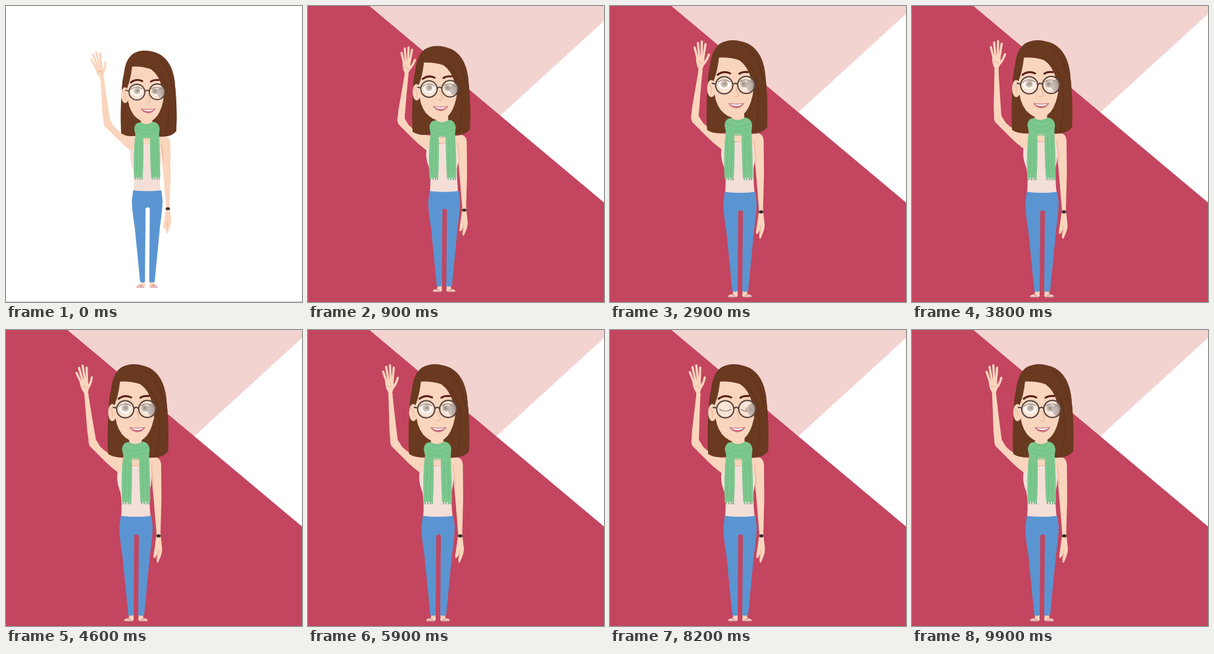
These frames come from a looping animation (450x450 px, 10 s). An HTML page:

```html
<!DOCTYPE html>
<html lang="en">
<head>
<meta charset="utf-8">
<title>Waving woman</title>
<style>
  html, body { margin: 0; width: 100%; height: 100%; overflow: hidden; background: #fff; }
  svg { display: block; width: 100vw; height: 100vh; }
  .skin { fill: #fad5bd; }
  .hair { fill: #693920; }
  .shade { fill: none; stroke: #eab795; stroke-width: 1.2; stroke-linecap: round; }
  .fingers { fill: none; stroke: #fad5bd; stroke-width: 3.4; stroke-linecap: round; }
  .fold { fill: none; stroke: #6fbb84; stroke-width: 1; stroke-linecap: round; }
  .lens { fill: #fff; fill-opacity: .32; stroke: #56443f; stroke-width: 2; }
</style>
</head>
<body>
<svg viewBox="0 0 450 450">
  <path id="pale" fill="#f3d3d0" d="M-400 788L288 160L850 -353V-800H-400Z"/>
  <path id="crimson" fill="#c4455f" d="M-384 -399.500L94 .5L930 701L-384 1400Z"/>
  <path id="floor" stroke="#c9c9c9" d="M0 449.5H450"/>

  <g id="woman">
    <!-- legs and feet -->
    <path class="skin" d="M187 430H194V437Q195 442 191 442H181Q178 441 181 439L187 437ZM201.500 430H208.500V437L214 439Q217 441 214 442H204Q200 442 201.500 437Z"/>
    <path d="M180 442H193M203 442H215M184 438L190 440M205 440L211 438" stroke="#c98297" stroke-width="1.300" fill="none"/>
    <path fill="#f4dfd8" d="M174 204Q185 208 196 206Q209 208 219 204Q224 226 218 246Q218 270 220 284H175Q177 262 174 246Q164 222 174 204Z"/>
    <path fill="#5a95d2" d="M174.500 282Q198 285 221 282L223 298Q223 312 219 340L210 433Q206 435 201 433L202 312Q198.500 308 195 312L194 433Q190 435 186 433L177 342Q172 312 172.500 298Z"/>

    <g class="upper">
      <!-- shoulders and arms -->
      <path class="skin" d="M135 164L143 177Q154 188 169 193L188 195H208L228 193Q235 195 235.500 204L236 255L234.500 310H228.500L224 255L220 212Q211 206 196 206Q184 206 176 209Q174 216 171 217Q160 209 151 200L127 176Q124 170 126 164Z"/>
      <path class="skin" d="M228.500 309H234.500L236.500 327Q238 335 235 343L231 353Q228 354 229 348L230 339L227 345Q223 348 224 342L226 328Z"/>
      <path class="shade" d="M231 334L229 348M221 205L224 235"/>
      <path d="M228 312.500H235" stroke="#55413b" stroke-width="3.400"/>
      <circle cx="231.500" cy="312.500" r="2.500" fill="#332b2b"/>
      <path d="M176 206L179 194M216 206L217 194" stroke="#eccfc5" stroke-width="2"/>
      <g id="forearm">
        <path class="skin" d="M125.500 169L125 154Q126 132 127.500 96H133.500Q134.500 128 136.500 166Q131 178 125.500 169Z"/>
        <g id="hand">
          <path class="skin" d="M-3 3L-3 -3Q-7 -10 -6.500 -20Q0 -26 6 -19Q7 -9 3 -3L3 3Z"/>
          <path class="fingers" d="M-4.500 -19L-8.500 -35M-1.500 -21L-3.500 -42M2 -21L2.500 -44M4.500 -19L8 -40M3 -8Q9 -13 13 -24"/>
          <path class="shade" d="M-4 -12Q0 -14 3 -10"/>
        </g>
      </g>
    </g>

    <g class="head">
      <path class="hair" d="M165 76Q155 91 155 120Q152 155 154 188Q165 195 180 192L212 193Q236 196 245 184Q247 145 242 100Q237 72 215 57L185 54Z"/>
    </g>

    <g class="upper">
      <path class="skin" d="M187 160H206V190Q202 205 196 206Q190 205 187 190Z"/>
      <path d="M188 172Q196 178 205 172" fill="none" stroke="#dca98c" stroke-width="2"/>
    </g>

    <g class="head">
      <!-- face -->
      <ellipse class="skin" cx="160.500" cy="125" rx="6.500" ry="13"/>
      <path class="shade" d="M157 119Q163 123 160 132"/>
      <path class="skin" d="M164 84Q174 70 205 76Q226 92 225 125Q222 148 213 160Q204 170 196 170Q185 169 175 158Q165 145 164 122Z"/>
      <g id="eyes">
        <ellipse cx="180" cy="119" rx="9" ry="7" fill="#fff"/>
        <ellipse cx="213" cy="119" rx="8" ry="7" fill="#fff"/>
        <g fill="#a8937b"><circle cx="180" cy="118" r="5.500"/><circle cx="210" cy="118" r="5.500"/></g>
        <g fill="#6a574a"><circle cx="180" cy="118" r="2.500"/><circle cx="210" cy="118" r="2.500"/></g>
        <path d="M170 116Q179 108 189 115M203 115Q212 108 222 116" fill="none" stroke="#6b4c42" stroke-width="1.300"/>
      </g>
      <path id="lids" d="M171 120Q180 126 189 120M204 120Q212 126 220 120" fill="none" stroke="#5b4039" stroke-width="1.500"/>
      <path d="M170 104Q179 97 189 102M203 102.500Q208 99 216 100" fill="none" stroke="#571f1a" stroke-width="3" stroke-linecap="round"/>
      <path class="shade" d="M198 124L202 135Q200 139 195 137"/>
      <path d="M186 147Q198 149 211 147Q206 155 198 155Q190 154 186 147Z" fill="#c9737f"/>
      <path d="M189 148.500Q198 150 208 148.500Q205 151.500 198 151.500Q192 151 189 148.500Z" fill="#fff"/>
      <!-- fringe -->
      <path class="hair" d="M158 111Q156 70 173 57Q191 46 217 57Q238 69 242 100Q247 140 245 184Q235 196 215 191Q220 169 223 145Q226 127 221 111Q216 91 203 82Q188 77 172 78Q170 98 164 113Z"/>
      <path d="M203 80Q225 89 231 123Q235 154 227 190M212 60Q235 78 239 115" fill="none" stroke="#5f331c" stroke-width="1.200"/>
      <!-- glasses -->
      <path d="M210 119L221 110Q227 114 226 122Q224 130 219 132Z" fill="#7f685d" opacity=".75"/>
      <circle class="lens" cx="180" cy="120" r="13"/>
      <circle class="lens" cx="213.500" cy="119.500" r="13"/>
      <path d="M193 119Q197 115 200.500 119M167 118L161 117" fill="none" stroke="#56443f" stroke-width="2"/>
      <path d="M172 112L178 108L186 130L181 132ZM207 110L212 108L221 129L217 132Z" fill="#fff" opacity=".18"/>
    </g>

    <g class="upper">
      <!-- scarf -->
      <path fill="#7cc78d" d="M176 181Q177 169 187 170Q196 176 207 169Q217 170 218 181L217 190Q219 225 219 261H204Q202 226 202 195H191Q192 230 190 261H176Q174 220 178 190Z"/>
      <path class="fold" d="M179 178Q196 190 216 177M180 184Q196 197 215 184M187 171Q196 181 207 171M181 198L180 253M187 202L186 256M207 200L208 254M213 198L214 252"/>
      <path d="M178 261V264.500M182 261V264.500M186 261V264.500M189 261V264.500M206 261V264.500M210 261V264.500M214 261V264.500M217 261V264.500" stroke="#7cb98b" stroke-width="2"/>
      <path class="skin" d="M191 195H202L200 203Q196 206 192 203Z"/>
      <path class="fold" d="M190 195Q196 198 203 195"/>
    </g>
  </g>
</svg>
<script>
const LOOP = 10;
const $ = id => document.getElementById(id);
const heads = document.querySelectorAll('.head'), uppers = document.querySelectorAll('.upper');
const place = (el, transform) => el.setAttribute('transform', transform);
const show = (el, on) => el.setAttribute('visibility', on ? 'visible' : 'hidden');
const part = (t, a, b) => Math.min(1, Math.max(0, (t - a) / (b - a)));
const easeOut = p => 1 - (1 - p) ** 3;
const smooth = p => p * p * (3 - 2 * p);

// Wave phase in degrees at given seconds; the pace wavers slightly.
const PHASE = [[0, -53], [.9, 86], [2.9, 1515], [4.6, 2410], [7.2, 3776], [8.2, 4355], [10, 5310]];
function phaseAt(t) {
  const i = PHASE.findIndex(k => k[0] > t);
  const [a, from] = PHASE[i - 1], [b, to] = PHASE[i];
  return from + (to - from) * part(t, a, b);
}

function backdrop(t) {
  const out = 430 * (1 - easeOut(part(t, 0, .8)));
  place($('crimson'), `translate(${-.642 * out} ${.767 * out})`);
  const slide = -330 + 338 * easeOut(part(t, 0, .8)) - 8 * smooth(part(t, .8, 2));
  place($('pale'), `translate(${.674 * slide} ${.738 * slide})`);
  show($('floor'), t < .1);
}

function woman(t) {
  const p = part(t, 0, 2), scale = .921 + .079 * p;
  place($('woman'), `translate(${214.5 - 17 * p} ${427.5 + 15 * p}) scale(${scale}) translate(-197.5 -442)`);

  const phase = phaseAt(t) * Math.PI / 180, swing = Math.sin(phase);
  place($('forearm'), `rotate(${7.5 * swing} 130.5 168)`);
  place($('hand'), `translate(130.5 97) rotate(${-6 - 7 * Math.cos(phase)})`);

  const sway = -2.5 - 4 * swing;
  heads.forEach(el => place(el, `translate(${sway})`));
  uppers.forEach(el => place(el, `translate(${.3 * sway})`));

  const blink = Math.abs((t + .8) % 3 - 1.5) > 1.4 && t > 1;
  show($('eyes'), !blink);
  show($('lids'), blink);
}

function draw(now) {
  // The picture advances in tenths of a second.
  const t = Math.floor(now / 100 + .01) / 10 % LOOP;
  backdrop(t);
  woman(t);
  requestAnimationFrame(() => draw(performance.now() - start));
}
const start = performance.now();
draw(0);
</script>
</body>
</html>
```
